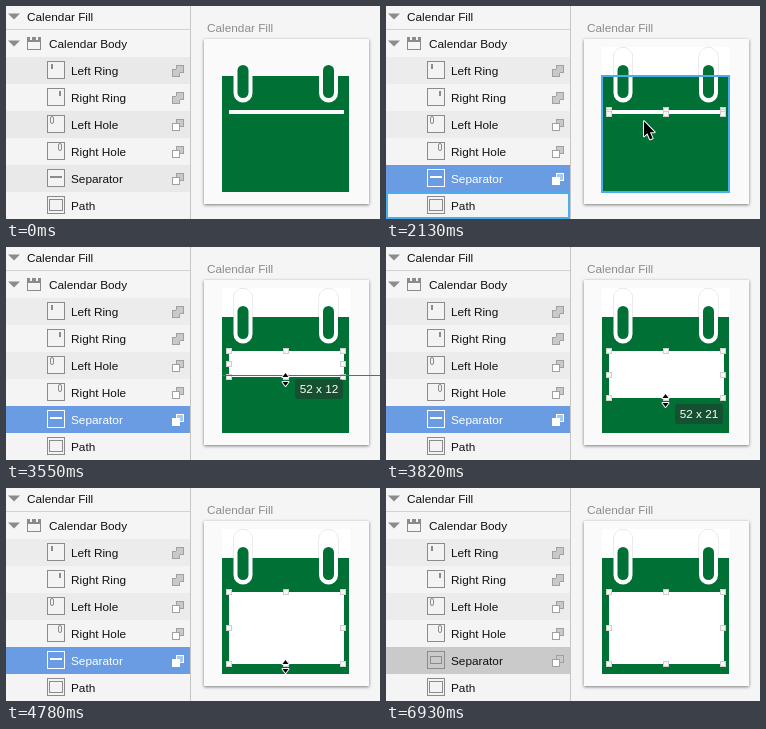
Animation of 374x213 px, one loop 7030 ms. Source, as an HTML page with a canvas:

```html
<!DOCTYPE html>
<html lang="en">
<head>
<meta charset="utf-8">
<title>Resizing a layer</title>
<style>
  html, body { margin: 0; width: 100%; height: 100%; overflow: hidden; background: #f5f5f5; }
  canvas { display: block; }
</style>
</head>
<body>
<canvas id="stage" width="374" height="213"></canvas>
<script>
const ctx = document.getElementById('stage').getContext('2d');
const LOOP = 7030, TICK = 88.6;
const GREEN = '#007035', BLUE = '#699ce2', HOVER = '#4aaeee', PAPER = '#fafafa', INK = '#111', LINE = '#8b8b8b';
const LAYERS = ['Left Ring', 'Right Ring', 'Left Hole', 'Right Hole', 'Separator', 'Path'];
const ROW = 27, ROWS_TOP = 51;
const TOP = 104, LEFT = 223, WIDTH = 115, UNIT = 2.2;
const ARROW = new Path2D('M1 1v15l3.4 -3 2.6 6 2.6 -1 -2.6 -6h4.6z');
const RESIZE = new Path2D('M0 -6.5l3 4h-6zM0 6.5l3 -4h-6z');

// Progress of n from a to b, limited to 0..1
const span = (n, a, b) => Math.min(1, Math.max(0, (n - a) / (b - a)));
const mix = (a, b, p) => a + (b - a) * p;
const smooth = p => p * p * (3 - 2 * p);

function rect(x, y, w, h, fill, stroke, lineWidth = 1) {
  if (fill) { ctx.fillStyle = fill; ctx.fillRect(x, y, w, h); }
  if (stroke) {
    ctx.strokeStyle = stroke;
    ctx.lineWidth = lineWidth;
    ctx.strokeRect(x + lineWidth / 2, y + lineWidth / 2, w - lineWidth, h - lineWidth);
  }
}

function pill(x, y, w, h, r, fill, stroke) {
  ctx.beginPath();
  ctx.roundRect(x, y, w, h, r);
  if (fill) { ctx.fillStyle = fill; ctx.fill(); }
  if (stroke) { ctx.strokeStyle = stroke; ctx.lineWidth = 1; ctx.stroke(); }
}

function text(str, x, y, color, align = 'left') {
  ctx.font = '11.8px "Liberation Sans", Arial, sans-serif';
  ctx.textAlign = align;
  ctx.fillStyle = color;
  ctx.fillText(str, x, y);
}

function pointer(shape, x, y) {
  ctx.save();
  ctx.translate(x, y);
  ctx.lineJoin = 'round';
  ctx.lineWidth = 2;
  ctx.strokeStyle = '#fff';
  ctx.stroke(shape);
  ctx.fillStyle = '#000';
  ctx.fill(shape);
  ctx.restore();
}

function groupHeading(name, x, baseline) {
  const y = baseline - 7.5;
  ctx.fillStyle = LINE;
  ctx.fill(new Path2D(`M2 ${y}h12l-6 6z`));
  text(name, x, baseline, INK);
}

function calendarIcon(x, y) {
  rect(x, y, 14, 13, '#f5f5f5', LINE);
  rect(x, y, 14, 5, LINE);
  for (const dx of [3, 9]) rect(x + dx, y, 2, 3, '#f5f5f5');
}

function layerIcon(name, x, y, color, tall, selected) {
  rect(x, y, 18, 18, selected ? null : '#f3f3f3', color);
  const markX = x + (name.startsWith('Right') ? 12 : 4);
  if (name.endsWith('Ring')) rect(markX, y + 3, 2, 5, color);
  else if (name.endsWith('Hole')) pill(markX - .5, y + 1.5, 3, 7, 1.5, null, color);
  else if (name === 'Path') rect(x + 2, y + 3, 14, 12, null, color);
  else if (tall) rect(x + 3, y + 5, 12, 8, null, color);
  else rect(x + 3, y + 7, 12, 2, color);
}

function booleanIcon(x, y, union, color, blue) {
  const solid = blue ? '#a9c6ee' : '#c9c9c9';
  rect(x + 4, y, 8, 8, solid, color);
  rect(x, y + 4, 8, 8, union ? solid : '#fff', color);
  if (union) rect(x + 4, y + 4, 4, 4, solid);
}

function layerRow(name, i, n) {
  const selected = n >= 13 && name === 'Separator', gray = n >= 78, blue = selected && !gray;
  const y = ROWS_TOP + ROW * i;
  const stripe = i % 2 ? '#f4f4f4' : n >= 13 ? '#ececec' : '#e9e9e9';
  rect(0, y, 184, ROW, blue ? BLUE : selected ? '#cacaca' : stripe);
  layerIcon(name, 41, y + 4, blue ? '#fff' : LINE, gray, selected);
  text(name, 65, y + 18, blue ? '#fff' : INK);
  if (name !== 'Path') booleanIcon(166, y + 8, name.endsWith('Ring'), blue ? '#fff' : '#a0a0a0', blue);
}

function sidebar(n) {
  rect(0, 23, 184, 1, '#d2d2d2');
  groupHeading('Calendar Fill', 21, 15);
  groupHeading('Calendar Body', 43, 42);
  calendarIcon(21, 31);
  LAYERS.forEach((name, i) => layerRow(name, i, n));
  if (n >= 23 && n < 27) rect(0, 186, 184, ROW, null, HOVER, 2);
  rect(184, 0, 1, 213, '#c6c6c6');
}

function artboard() {
  text('Calendar Fill', 201, 26, '#8c8c8c');
  ctx.save();
  ctx.shadowColor = 'rgba(0,0,0,.5)';
  ctx.shadowBlur = 3;
  ctx.shadowOffsetY = 1;
  rect(198, 33, 165, 165, PAPER);
  ctx.restore();
}

function calendar(editing, edge) {
  const white = editing ? '#fff' : PAPER, rings = [237, 322.5];
  if (editing) {
    rect(216, 41, 128, 29, white);
    for (const x of rings) pill(x - 9.5, 41.5, 19, 55, 9.5, null, '#d8d8d8');
  }
  rect(216, 70, 127, 116, GREEN);
  for (const x of rings) {
    if (editing) pill(x - 9.5, 41.5, 19, 55, 9.5, white);
    else pill(x - 9.5, 69, 19, 27.5, [0, 0, 9.5, 9.5], white);
    pill(x - 5.5, 59, 11, 33, 5.5, GREEN);
  }
  rect(LEFT, TOP, WIDTH, edge - TOP, white);
}

function handles(edge) {
  for (let row = 0; row < 3; row++)
    for (let col = 0; col < 3; col++) {
      if (row === 1 && col === 1) continue;
      const x = LEFT + col * 57, y = Math.round(mix(TOP, edge, row / 2));
      rect(x - 3, y - 3, 6, 6, '#f6f6f6', '#cfcfcf');
    }
}

function sizeLabel(edge, alpha) {
  const y = Math.round(142 + (edge - 130) * 1.18);
  ctx.globalAlpha = alpha;
  pill(289, y - 10, 48, 20, 3, 'rgba(45,45,45,.48)');
  text('52 x ' + Math.round((edge - TOP) / UNIT), 313, y + 4, '#fff', 'center');
  ctx.globalAlpha = 1;
}

function cursor(n, edge) {
  if (n < 2 || n >= 65) return;
  if (n < 18) {
    const p = span(n, 1, 6);
    pointer(ARROW, mix(-14, 76, p), mix(145, 178, p) - span(n, 8, 9));
  } else if (n < 30) {
    const p = smooth(span(n, 18, 25.5));
    pointer(ARROW, mix(76, 278, p), mix(177, 107, p));
  } else if (n < 62) {
    pointer(RESIZE, 279.5, edge + 2.5);
  } else {
    const p = span(n, 61, 64);
    pointer(ARROW, mix(280, 336, p), mix(178, 210, p));
  }
}

function draw(time) {
  const n = Math.floor((time % LOOP + 10) / TICK);
  const edge = Math.round(mix(108, 174, span(n, 37, 46.2)) + 2 * span(n, 47, 49));
  const editing = n >= 13;
  rect(0, 0, 374, 213, '#f5f5f5');
  sidebar(n);
  artboard();
  calendar(editing, edge);
  if ((n >= 23 && n < 26) || (n >= 62 && n < 65)) rect(215, 69, 129, 118, null, HOVER, 2);
  if (editing) handles(edge);
  if (n >= 40 && n < 42) rect(216, 128, 158, 1, '#ff2a12');
  if (n >= 38 && n < 54) sizeLabel(edge, n === 53 ? .5 : 1);
  cursor(n, edge);
}

function loop() {
  draw(performance.now());
  requestAnimationFrame(loop);
}
loop();
</script>
</body>
</html>
```
